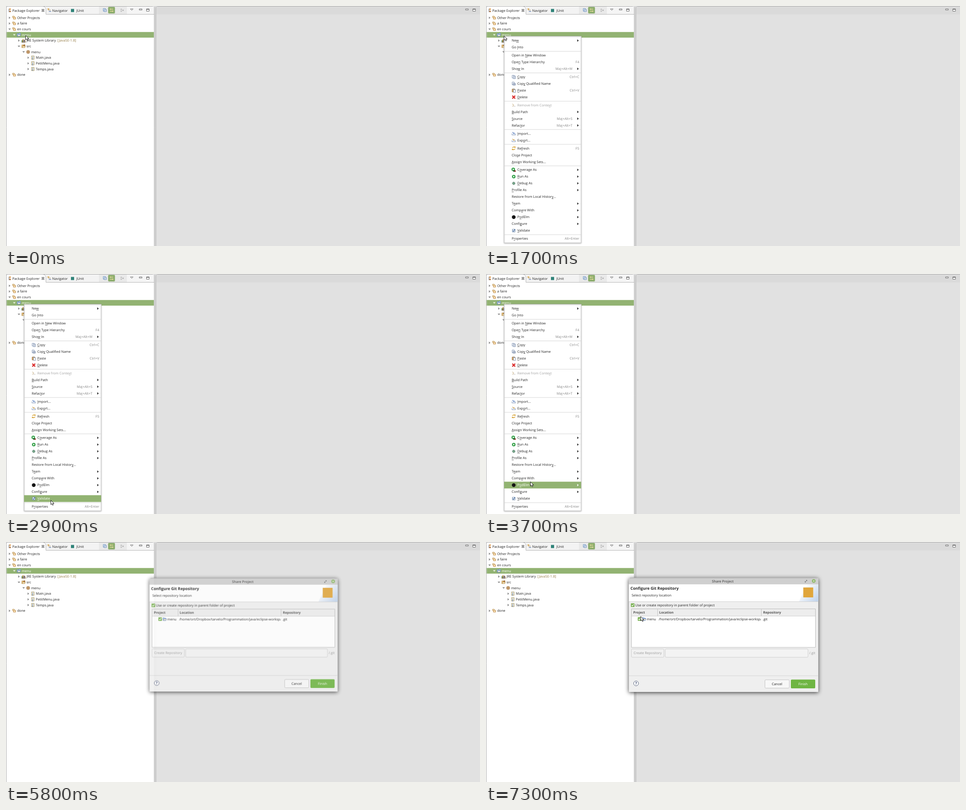
These frames come from a looping animation (1051x533 px, 8000 ms). An HTML page with a canvas:

```html
<!DOCTYPE html>
<html lang="en">
<head>
<meta charset="utf-8">
<title>Share Project</title>
<style>
html, body { margin: 0; width: 100%; height: 100%; overflow: hidden; background: #dcdcdc; }
canvas { display: block; }
</style>
</head>
<body>
<canvas id="stage" width="1051" height="533"></canvas>
<script>
const W = 1051, H = 533, LOOP = 8000;
const GREEN = '#92b372', INK = '#242424', DIM = '#858585';
const screen = document.getElementById('stage').getContext('2d');
let c = screen;

// ---------- helpers ----------
function rect(x, y, w, h, fill, stroke, r = 0) {
  c.beginPath();
  c.roundRect(x, y, w, h, r);
  if (fill) { c.fillStyle = fill; c.fill(); }
  if (stroke) { c.strokeStyle = stroke; c.lineWidth = 1; c.stroke(); }
}
function poly(points, fill, stroke, width = 1, closed = true) {
  c.beginPath();
  for (let i = 0; i < points.length; i += 2) c.lineTo(points[i], points[i + 1]);
  if (closed) c.closePath();
  if (fill) { c.fillStyle = fill; c.fill(); }
  if (stroke) { c.strokeStyle = stroke; c.lineWidth = width; c.stroke(); }
}
const line = (points, color, width = 1) => poly(points, null, color, width, false);
function disc(x, y, r, fill, stroke) {
  c.beginPath();
  c.arc(x, y, r, 0, 7);
  if (fill) { c.fillStyle = fill; c.fill(); }
  if (stroke) { c.strokeStyle = stroke; c.lineWidth = 1; c.stroke(); }
}
// Text centred vertically on y; "&" underlines the next letter.
function text(label, x, y, color = INK, { size = 7.5, weight = 400, align = 'left' } = {}) {
  c.font = `${weight} ${size}px "Open Sans", "Noto Sans", sans-serif`;
  c.textRendering = 'geometricPrecision';
  c.textAlign = align;
  c.fillStyle = color;
  const base = y + size * 0.35, cut = label.indexOf('&'), plain = label.replace('&', '');
  c.fillText(plain, x, base);
  if (cut >= 0) {
    const left = x + c.measureText(plain.slice(0, cut)).width;
    c.fillRect(left, base + 1.1, c.measureText(plain[cut]).width, 0.7);
  }
}
function layer(draw) {
  const canvas = document.createElement('canvas');
  canvas.width = W;
  canvas.height = H;
  c = canvas.getContext('2d');
  draw();
  c = screen;
  return canvas;
}
function shadow(blur, alpha, dy = 1) {
  c.shadowColor = `rgba(0,0,0,${alpha})`;
  c.shadowBlur = blur;
  c.shadowOffsetY = dy;
}
const noShadow = () => { c.shadowColor = 'transparent'; };
const arrowRight = (x, y, color, s = 2.7) => poly([x, y - s, x + s + 0.5, y, x, y + s], color);

// ---------- icons, drawn around (0, 0) ----------
function folder(fill, edge) {
  poly([-3.5, 3, -3.5, -3, -1, -3, 0, -2, 3, -2, 3, 3], fill, edge, 0.8);
  poly([-3.5, 3, -1.8, -0.3, 4.3, -0.3, 3, 3], '#fff3d0', edge, 0.8);
}
function page(x, y, edge) {
  rect(x, y, 4.5, 6, '#fff', edge);
}
function runDisc() {
  disc(0, 0, 3.9, '#2f9e44');
  poly([-1.3, -2.2, 2.4, 0, -1.3, 2.2], '#fff');
}
function tray(color) {
  poly([-4, 0, -4, 3.5, 4, 3.5, 4, 0], '#e3ebf5', '#8295b5', 0.8, false);
  line([-3, -3, 1, 0.5, 1, -2], color, 1.2);
}
const icons = {
  set() { rect(-3.5, -3.5, 4, 3, '#f8e8c4', '#bf9c63'); rect(-1.7, -1, 5, 4, '#fbe6b8', '#bd8848'); },
  project() { folder('#b5cff0', '#5779b5'); rect(0.7, -3.8, 3, 3, '#dbe7f8', '#5f80b8'); },
  library() {
    rect(-4, -1, 2, 5, '#3c7a4a'); rect(-2, -3, 2, 7, '#c98a32'); rect(0, -1.5, 2, 5.5, '#4f6fa5');
    line([2.5, -2, 4, 4], '#8a5a2a', 1.6); line([-4, 3.8, 4.5, 3.8], '#574025', 0.8);
  },
  source() { folder('#eec77c', '#a8792f'); rect(0.3, -3.4, 3, 2.6, '#d9a45c', '#8f5c2a'); },
  pack() {
    rect(-3, -3, 6, 6, '#f2d9ae', '#95602c', 1);
    line([0, -3.5, 0, 3.5], '#95602c'); line([-3.5, 0, 3.5, 0], '#95602c');
  },
  java() { rect(-2.8, -3.8, 5.8, 7.4, '#fffbe8', '#a09468'); text('J', 0, 0, '#35599c', { size: 6.5, weight: 700, align: 'center' }); },
  copy() { page(-3.5, -3.5, '#7d90b0'); page(-0.8, -2, '#7d90b0'); line([0.5, 0, 2.7, 0], '#7d90b0'); line([0.5, 2, 2.7, 2], '#7d90b0'); },
  copyName() { page(-3.5, -3.5, '#7d90b0'); rect(-1.5, -0.5, 5, 4, '#fff', '#6b7ea0'); line([-0.5, 1.5, 3, 1.5], '#4c628c'); },
  paste() { rect(-3.5, -3, 6, 6.5, '#d9a765', '#9a713c'); rect(-1.8, -4, 2.6, 1.8, '#999'); page(-0.5, -1.5, '#7d90b0'); },
  remove() { line([-3, -3, 0, 0, -3, 3], '#d8c7a8', 1.5); disc(2.5, 2.5, 1, '#c6c6c6'); disc(0, 2.8, 0.8, '#c6c6c6'); },
  cross() { line([-3.2, -3.2, 3.2, 3.2], '#d92b2b', 2.4); line([-3.2, 3.2, 3.2, -3.2], '#d92b2b', 2.4); },
  bring() { tray('#4a72b8'); },
  send() { tray('#c8963c'); },
  refresh() {
    c.lineWidth = 1.5; c.strokeStyle = '#d6a02e';
    for (const a of [0.3, 3.44]) { c.beginPath(); c.arc(0, 0, 2.9, a, a + 2.3); c.stroke(); }
    poly([1, -4.2, 4.3, -3.6, 3.6, -0.6], '#d6a02e'); poly([-1, 4.2, -4.3, 3.6, -3.6, 0.6], '#d6a02e');
  },
  coverage() { c.save(); c.translate(-1, -1); runDisc(); c.restore(); rect(-1, 1.5, 5.5, 2.5, '#1d3b1d'); rect(2, 1.5, 2.5, 2.5, '#a32b20'); },
  run: runDisc,
  debug() {
    for (const a of [0, 0.8, 1.57, 2.36]) {
      const x = 4 * Math.cos(a), y = 4 * Math.sin(a);
      line([-x, -y, x, y], '#4b7a62', 0.8);
    }
    disc(0, 0, 2.2, '#8cc0a0', '#38674e');
  },
  dot() { disc(0, 0, 4.2, '#151515'); },
  check() { rect(-3, -3, 6, 6, '#fff', '#6d87a8'); line([-1.8, -0.2, -0.4, 1.6, 2.6, -3], '#2d5a96', 1.2); },
  tick() { rect(-4, -4, 8, 8, '#79b052', null, 1); line([-2.2, 0, -0.6, 1.8, 2.4, -2], '#fff', 1.3); },
  openFolder() { folder('#a9c6ec', '#5779b5'); }
};
function icon(name, x, y) {
  c.save();
  c.translate(x, y);
  icons[name]();
  c.restore();
}

// ---------- workbench ----------
const tree = [
  [0, 'set', 'Other Projects', '>'], [0, 'set', 'a faire', '>'], [0, 'set', 'en cours', 'v'],
  [1, 'project', 'menu', 'v'], [2, 'library', 'JRE System Library', '>'], [2, 'source', 'src', 'v'],
  [3, 'pack', 'menu', 'v'], [4, 'java', 'Main.java', '>'], [4, 'java', 'PetitMenu.java', '>'],
  [4, 'java', 'Temps.java', '>'], [0, 'set', 'done', '>']
];
function windowButtons(x) {
  rect(x - 2.5, 6.5, 6, 2.5, '#fff', '#666');
  rect(x + 13.5, 6.5, 6, 5, '#fff', '#666');
  line([x + 13.5, 7.5, x + 19.5, 7.5], '#666');
}
function drawWorkbench() {
  rect(0, 0, W, H, '#dcdcdc');
  rect(0.5, 0.5, 328.3, 540, '#fff', '#a9a9a9', 4);
  rect(88, 1, 180, 17, '#f3f3f3');
  rect(206, 1, 62, 17, '#e9e9e9');
  rect(268, 1, 60, 17, '#f5f5f5');
  line([82, 0.5, 86, 2, 88.5, 6, 88.5, 18.5, 329, 18.5], '#b4b4b4');
  rect(332.2, 0.5, 730, 540, '#e1e1e1', '#a9a9a9', 4);
  rect(333, 1, 718, 17.5, '#dadada');

  line([6.5, 6, 6.5, 13.5], '#777'); rect(7.5, 5.5, 3, 3, '#d98e3a'); rect(7.5, 10.5, 3, 3, '#a5642c');
  text('Package Explorer', 14, 10, INK, { size: 7.6 });
  line([79.5, 7, 84.5, 12.5], '#555', 2.4); line([84.5, 7, 79.5, 12.5], '#555', 2.4);
  line([79.5, 7, 84.5, 12.5], '#fff', 0.8); line([84.5, 7, 79.5, 12.5], '#fff', 0.8);
  line([93.5, 6.5, 93.5, 9, 99, 9], '#b18a4c'); line([95, 12, 100, 12], '#6d87b5', 1.5); rect(92, 5.5, 4, 2, '#d9aa55');
  text('Navigator', 102.5, 10, INK, { size: 7.6 });
  rect(144, 6.5, 7, 7, '#2f8378');
  text('JUnit', 172.7, 10, INK, { size: 7.6, align: 'right' });

  rect(215.5, 5.5, 5, 6, '#e8f0fa', '#7a9cc4'); rect(217.5, 7.5, 5, 5, '#fff', '#6a8fbd'); line([218.5, 10, 221.5, 10], '#3f6aa3');
  rect(227, 2.5, 14, 13.5, '#8cad6c', '#83a463', 1);
  line([231, 7, 237.5, 7], '#fbe5a6', 1.2); line([230.5, 11.5, 237, 11.5], '#fbe5a6', 1.2);
  poly([232, 5.2, 229.8, 7, 232, 8.8], '#fbe5a6'); poly([236, 9.7, 238.4, 11.5, 236, 13.3], '#fbe5a6');
  rect(254, 6, 3, 3, '#c5c5c5'); rect(254, 10, 3, 3, '#c5c5c5'); rect(258, 8, 3, 3, '#bbb');
  poly([275.8, 6.5, 281.8, 6.5, 278.8, 9.8], '#fff', '#666', 0.9);
  windowButtons(298);
  windowButtons(1021.5);

  tree.forEach(([level, name, label, state], i) => {
    const y = 26.1 + i * 12.66, x = 8 + level * 10.35, selected = i === 3;
    if (selected) rect(1.5, y - 6.4, 326.3, 12.6, GREEN);
    const tint = selected ? '#e9f0e2' : '#858585';
    if (state === '>') arrowRight(x - 1.5, y, tint);
    else poly([x - 2.8, y - 1.5, x + 2.8, y - 1.5, x, y + 1.8], tint);
    icon(name, x + 10, y);
    text(label, x + 16.7, y, selected ? '#fff' : INK, { size: 7.6 });
    if (name === 'library') text('[JavaSE-1.8]', 155.5, y, '#957d47', { size: 7.6, align: 'right' });
  });
}

// ---------- context menu: label, icon, shortcut ('>' opens a submenu) ----------
const menu = [
  ['Ne&w', '', '>'], ['Go &Into'], null,
  ['Open in &New Window'], ['Ope&n Type Hierarchy', '', 'F4'], ['Sho&w In', '', 'Maj+Alt+W>'], null,
  ['&Copy', 'copy', 'Ctrl+C'], ['Cop&y Qualified Name', 'copyName'], ['&Paste', 'paste', 'Ctrl+V'], ['&Delete', 'cross'], null,
  ['Remove from Conte&xt', 'remove'], ['&Build Path', '', '>'], ['&Source', '', 'Maj+Alt+S>'], ['Refac&tor', '', 'Maj+Alt+T>'], null,
  ['&Import...', 'bring'], ['Exp&ort...', 'send'], null,
  ['Re&fresh', 'refresh', 'F5'], ['Clo&se Project'], ['&Assign Working Sets...'], null,
  ['C&overage As', 'coverage', '>'], ['&Run As', 'run', '>'], ['&Debug As', 'debug', '>'], ['&Profile As', '', '>'],
  ['Restore from Local Histor&y...'], ['T&eam', '', '>'], ['Comp&are With', '', '>'], ['P&odElm', 'dot', '>'],
  ['Confi&gure', '', '>'], ['&Validate', 'check'], null,
  ['P&roperties', '', 'Alt+Enter']
];
function panel(x, y, w, h) {
  shadow(3, 0.25);
  rect(x, y, w, h, '#fff', '#c6c6c6');
  noShadow();
}
function drawMenu(active) {
  panel(40.2, 67.2, 171, 458.8);
  let y = 76.7;
  for (const item of menu) {
    if (!item) {
      line([41, y - 6, 211, y - 6], '#d6d6d6');
      y += 2.86;
      continue;
    }
    const [label, name, keys = ''] = item;
    const hot = label.replace('&', '') === active;
    const color = hot ? '#fff' : name === 'remove' ? '#a0a0a0' : INK;
    if (hot) rect(40, y - 7.5, 171, 15, GREEN);
    if (name) icon(name, 61.5, y);
    text(label, name ? 69.5 : 57, y, color);
    const opens = keys.endsWith('>');
    text(keys.replace('>', ''), opens ? 191.7 : 206.7, y, hot ? '#e4eddb' : DIM, { align: 'right' });
    if (opens) arrowRight(202.4, y, hot ? '#fff' : '#222');
    y += 15;
  }
}
function drawSubmenu(shareActive) {
  panel(210.2, 429.2, 84.3, 37);
  text('Appl&y Patch...', 226.5, 438.8);
  line([211, 447.7, 294, 447.7], '#d6d6d6');
  if (shareActive) rect(210, 449, 84.5, 15, GREEN);
  text('&Share Project...', 226.5, 456.7, shareActive ? '#fff' : INK);
}

// ---------- dialog ----------
function drawDialog() {
  shadow(10, 0.75, 1.5);
  rect(316.8, 79.7, 420, 253.2, '#efefef', null, [3, 3, 1, 1]);
  noShadow();
  rect(316.8, 79.7, 420, 14.3, '#cfcfcf', null, [3, 3, 0, 0]);
  line([319, 80, 735, 80], '#a6a6a6', 0.8);
  text('Share Project', 525, 87, '#555', { weight: 600, align: 'center' });
  line([708, 88.5, 711, 85.5], '#666', 0.8);
  poly([709.5, 84.5, 712, 84.5, 712, 87], '#555'); poly([707, 87, 707, 89.5, 709.5, 89.5], '#555');
  disc(726.7, 86.6, 4, '#8fb86b');
  line([725.2, 85.1, 728.2, 88.1], '#fff'); line([728.2, 85.1, 725.2, 88.1], '#fff');

  rect(316.8, 94, 420, 38, '#fff');
  const sky = c.createLinearGradient(703, 100, 736, 128);
  sky.addColorStop(0, '#fff');
  sky.addColorStop(1, '#c3d5ec');
  poly([712, 94, 736.8, 94, 736.8, 132, 694, 132], sky);
  line([317, 132.5, 737, 132.5], '#d2d2d2');
  text('Configure Git Repository', 320.3, 103, INK, { size: 8.75, weight: 700 });
  text('Select repository location', 323, 118);
  rect(703.5, 101, 22, 22, '#e0a63c');

  icon('tick', 325.3, 140.3);
  text('Use or create repository in parent folder of project', 331, 140.3);
  rect(322.5, 148.5, 408, 85.5, '#fff', '#bcbcbc');
  rect(323, 149, 407, 15.5, '#ededed');
  line([323, 164.5, 730, 164.5], '#cfcfcf');
  for (const x of [380.5, 610.5]) line([x, 149, x, 164.5], '#c4c4c4');
  [['Project', 326.5], ['Location', 384], ['Repository', 614.5]]
    .forEach(([label, x]) => text(label, x, 156.5, '#555', { weight: 700, size: 7.4 }));
  icon('tick', 340.5, 171);
  icon('openFolder', 350.5, 171);
  text('menu', 356.5, 171.3);
  c.save();
  c.beginPath();
  c.rect(381, 165, 228.5, 14);
  c.clip();
  text('/home/ort/Dropbox/tarvelo/Programmation/java/eclipse-workspace/menu', 383, 171.3);
  c.restore();
  text('.git', 613.5, 171.3);

  rect(322.5, 237.5, 72, 18.5, '#f1f1f1', '#cfcfcf', 2);
  text('Create Repository', 358.5, 246.8, '#9b9b9b', { align: 'center' });
  rect(397.5, 237.5, 316.5, 18.5, '#f3f3f3', '#cfcfcf', 2);
  text('/.git', 716.8, 246.8, '#9b9b9b');
  line([317, 297, 737, 297], '#d4d4d4');
  disc(332.8, 314, 5.4, '#fff', '#5c6680');
  text('?', 332.8, 314.2, '#3c4a70', { size: 8.5, weight: 700, align: 'center' });
  rect(618.5, 306, 54, 18.5, '#f7f7f7', '#c2c2c2', 2);
  text('Cancel', 645.3, 315.5, INK, { align: 'center' });
  rect(676, 305.5, 54, 19.5, '#6fb543', null, 2);
  text('Finish', 703, 315.5, '#fff', { align: 'center' });
}

// ---------- timeline: start, pointer (or null), highlighted entry ----------
const steps = [
  [0, [43, 65]], [600, [39.5, 66]],
  [2000, [43, 79], 'New'], [2100, [56, 115], 'Open in New Window'], [2200, [74, 180], 'Copy Qualified Name'],
  [2300, [91, 252], 'Build Path'], [2400, [98, 352], 'Close Project'],
  [2900, [99, 502], 'Validate'], [3100, [100, 517], 'Properties'], [3700, [98, 461], 'PodElm'],
  [3900, [98, 437], 'Team'], [4600, [199, 451], 'Team'], [4900, null, 'Team'], [5100, [260, 458], 'Team'],
  [5800, null], [6400, [349, 181]], [6700, [338, 149]], [7000, [337.5, 142]], [7300, [342.5, 165]]
];
const workbench = layer(drawWorkbench);
const dialog = layer(drawDialog);

function drawPointer([x, y]) {
  c.save();
  c.translate(x + 0.5, y + 0.5);
  poly([0, 0, 0, 9.6, 2.2, 7.6, 3.8, 11, 5.5, 10.3, 4, 7, 7, 7], '#fff', '#111', 0.95);
  c.restore();
}
function render(t) {
  const [, pointer, active] = steps.findLast(([start]) => start <= t);
  c.drawImage(workbench, 0, 0);
  if (t >= 1700 && t < 5800) {
    drawMenu(active);
    if (t >= 4300) drawSubmenu(t >= 4900);
  }
  if (t >= 5800) {
    const opening = t < 6100, scale = opening ? 0.993 : 1;
    c.save();
    c.globalAlpha = opening ? 0.87 : 1;
    c.translate(527 * (1 - scale), 206.5 * (1 - scale));
    c.scale(scale, scale);
    c.drawImage(dialog, 0, 0);
    c.restore();
  }
  if (pointer) drawPointer(pointer);
}
function tick() {
  render(performance.now() % LOOP);
  requestAnimationFrame(tick);
}
tick();
</script>
</body>
</html>
```
